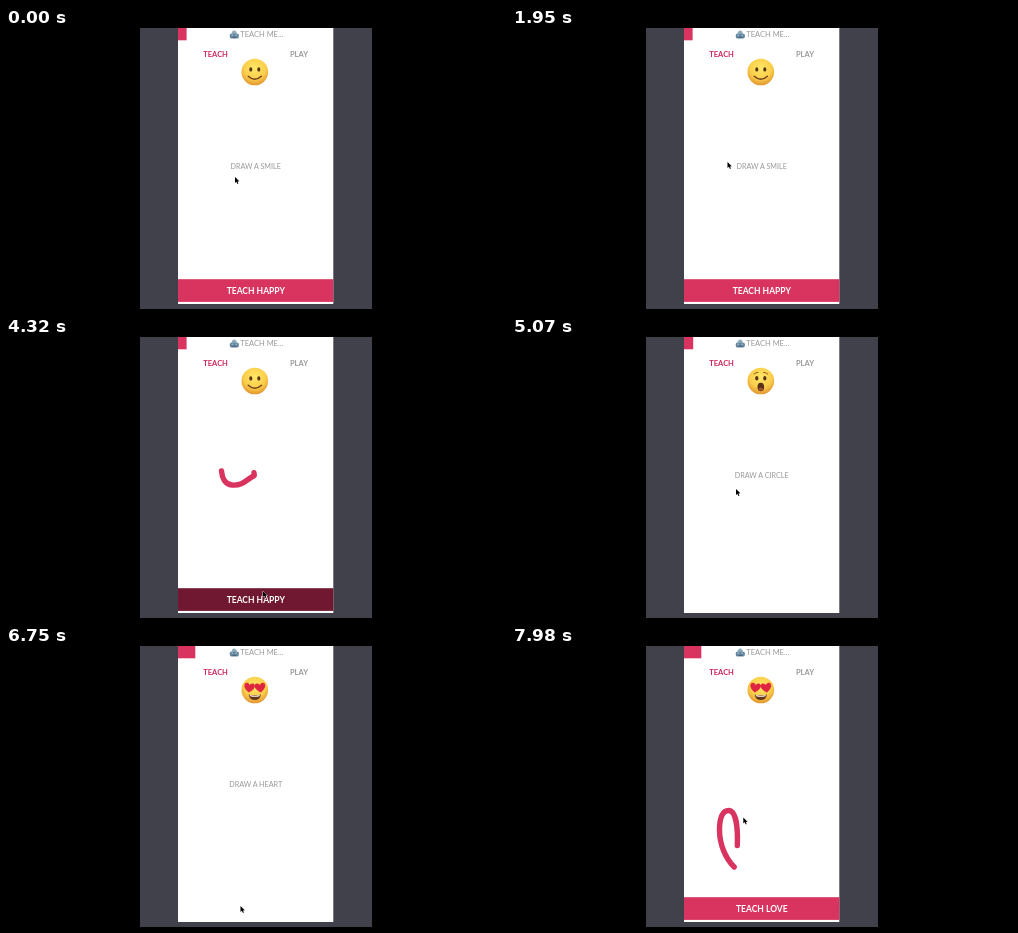
Animation of 500x281 px, one loop 8 s. Source, as an HTML page:

```html
<!DOCTYPE html>
<html lang="en">
<head>
<meta charset="utf-8">
<title>Teach me</title>
<style>
  html, body { margin: 0; width: 100%; height: 100%; overflow: hidden; background: #000; }
  svg { display: block; width: 100%; height: 100%; }
  text { font-family: Lato, sans-serif; font-size: 7.5px; fill: #999; }
  .bold { font-weight: 700; }
  .mid { text-anchor: middle; }
  .ink { fill: none; stroke: #d8345f; stroke-width: 5.4; stroke-linecap: round; stroke-linejoin: round; }
</style>
</head>
<body>
<svg viewBox="0 0 500 281">
  <defs>
    <radialGradient id="skin" cx=".5" cy=".35" r=".68">
      <stop offset="0" stop-color="#ffe765"/>
      <stop offset=".6" stop-color="#fbce4b"/>
      <stop offset="1" stop-color="#de8f2c"/>
    </radialGradient>
    <path id="love" d="M0 4.6C-7 .3-5.2-4.4-2.6-4.1-1-4-.3-3 0-2.2.3-3 1-4 2.6-4.1 5.2-4.4 7 .3 0 4.6Z" fill="#df2640"/>
  </defs>

  <rect width="500" height="281"/>
  <rect x="134" width="232" height="281" fill="#41414b"/>
  <rect x="172" width="155.3" height="276" fill="#fff"/>
  <rect id="progress" x="172" height="12.3" fill="#d8345f"/>

  <g id="robot">
    <path d="M225.4 6.5C225.4 1.2 231 1.2 231 6.5Z" fill="#8eaebd"/>
    <rect x="223.8" y="5.8" width="9" height="4.6" rx="1.4" fill="#6686a0"/>
    <path d="M225.7 7.2h1.2M229.6 7.2h1.2" stroke="#c4dce6"/>
    <path d="M226.5 9.4h3.6" stroke="#43586c" stroke-width=".8"/>
  </g>
  <text x="234.3" y="9.3">TEACH ME...</text>
  <text class="bold mid" x="209.6" y="28.7" style="fill:#cf285c">TEACH</text>
  <text class="bold mid" x="293" y="28.7">PLAY</text>

  <g transform="translate(248.8 44)">
    <circle r="13.3" fill="url(#skin)"/>
    <g class="face">
      <ellipse cx="-4" cy="-2.6" rx="1.5" ry="2.2" fill="#56351b"/>
      <ellipse cx="4" cy="-2.6" rx="1.5" ry="2.2" fill="#56351b"/>
      <path d="M-6.6 4.2Q0 10.2 6.6 4.2" fill="none" stroke="#6d411b" stroke-width="1.4" stroke-linecap="round"/>
    </g>
    <g class="face">
      <ellipse cx="-4" cy="-2.8" rx="1.6" ry="2.2" fill="#56351b"/>
      <ellipse cx="4" cy="-2.8" rx="1.6" ry="2.2" fill="#56351b"/>
      <path d="M-6.8-7Q-5-8.8-2.8-8.6M6.8-7Q5-8.8 2.8-8.6" fill="none" stroke="#8f5a20" stroke-linecap="round"/>
      <ellipse cy="6" rx="3.3" ry="4.3" fill="#56301b"/>
      <ellipse cy="8.2" rx="2.2" ry="1.6" fill="#a5522c"/>
    </g>
    <g class="face">
      <use href="#love" transform="translate(-5.4 -2.4) rotate(8) scale(1.08)"/>
      <use href="#love" transform="translate(5.4 -2.4) rotate(-8) scale(1.08)"/>
      <path d="M-6.2 4.4Q0 6.2 6.2 4.4 5.2 10 0 10-5.2 10-6.2 4.4Z" fill="#66351d"/>
      <path d="M-5.2 5Q0 6.4 5.2 5L4.6 6.2Q0 7.4-4.6 6.2Z" fill="#fff"/>
    </g>
  </g>

  <text id="hint" class="mid" x="249.7" y="140.6" style="font-size:7.2px"></text>

  <path class="ink" d="M215.5 134C216 140 218.5 147.5 226 148 237 149 240.5 142.5 248.3 138.5L248 135.8"/>
  <path class="ink" d="M224 155C209 154 202 167 204 180 206 196 219 206 233 202 247 197 249 180 244 167 240 157 232 154 224 155"/>
  <path class="ink" d="M222.2 221C214 213 207.5 199 207.5 184 207.5 171 211 164.3 217 164.5 224 165 226 182 225.3 199.5"/>

  <g id="button">
    <rect id="plate" x="172" y="251.2" width="155.3" height="22.7"/>
    <text id="label" class="bold mid" x="249.8" y="265.5" style="font-size:8.5px;fill:#fff"></text>
  </g>
  <path id="cursor" d="M0 0V6L1.4 4.8 2.4 7 3.4 6.5 2.5 4.4 4.3 4.3Z" stroke="#fff" stroke-width=".8" paint-order="stroke"/>
</svg>

<script>
const LOOP = 8000;
const PINK = '#d8345f', PRESSED = '#701831';
const byId = id => document.getElementById(id);
const inks = [...document.querySelectorAll('.ink')];
const faces = [...document.querySelectorAll('.face')];
const lengths = inks.map(ink => ink.getTotalLength());

// draw: [start, end] of the stroke; press: when the button goes dark
const lessons = [
  { from: 0, draw: [2190, 2840], press: 4200, hint: 'DRAW A SMILE', label: 'TEACH HAPPY', bar: 8.6, ready: true },
  { from: 4440, draw: [5220, 5940], press: 6330, hint: 'DRAW A CIRCLE', label: 'TEACH SHOCKED', bar: 9.2 },
  { from: 6480, draw: [7260, 7850], press: Infinity, hint: 'DRAW A HEART', label: 'TEACH LOVE', bar: 17.3 }
];

// [time, x, y] of the pointer tip between strokes
const moves = [
  [0, 229, 149], [400, 228, 148], [1080, 222.3, 143], [1950, 215.5, 134], [2190, 215.5, 134],
  [2840, 248, 135.8], [3090, 248, 135.8], [3900, 257, 254], [4470, 257, 254],
  [5070, 224, 152], [5220, 224, 155], [5940, 224, 155], [6280, 234.5, 260],
  [6750, 234.5, 260], [7020, 222.2, 221], [7260, 222.2, 221], [7850, 225.3, 199.5], [7980, 231.3, 171.5]
];

const clamp = v => Math.min(1, Math.max(0, v));
const ease = v => v * v * (3 - 2 * v);
const show = (node, on) => node.setAttribute('visibility', on ? 'visible' : 'hidden');

function pointerAt(t) {
  const i = moves.findIndex(move => move[0] > t);
  if (i < 0) return moves[moves.length - 1].slice(1);
  const [t0, x0, y0] = moves[i - 1], [t1, x1, y1] = moves[i];
  const k = ease((t - t0) / (t1 - t0));
  return [x0 + (x1 - x0) * k, y0 + (y1 - y0) * k];
}

function render(t) {
  const current = lessons.findLastIndex(lesson => t >= lesson.from);
  const { draw: [start, end], press, hint, label, bar, ready } = lessons[current];
  const drawn = clamp((t - start) / (end - start));
  const begun = t >= start;

  faces.forEach((face, i) => show(face, i === current));
  inks.forEach((ink, i) => show(ink, i === current && begun));
  const length = lengths[current], ink = inks[current];
  ink.style.strokeDasharray = `${Math.max(0.01, drawn * length)} ${length + 10}`;

  byId('progress').setAttribute('width', bar);
  byId('hint').textContent = begun ? '' : hint;
  byId('label').textContent = label;
  byId('plate').setAttribute('fill', t >= press ? PRESSED : PINK);
  show(byId('button'), ready || begun);

  let [x, y] = pointerAt(t);
  if (begun && t < end) ({ x, y } = ink.getPointAtLength(drawn * length));
  byId('cursor').setAttribute('transform', `translate(${x} ${y})`);
}

const origin = performance.now();
function tick() {
  render((performance.now() - origin) % LOOP);
  requestAnimationFrame(tick);
}
tick();
</script>
</body>
</html>
```
